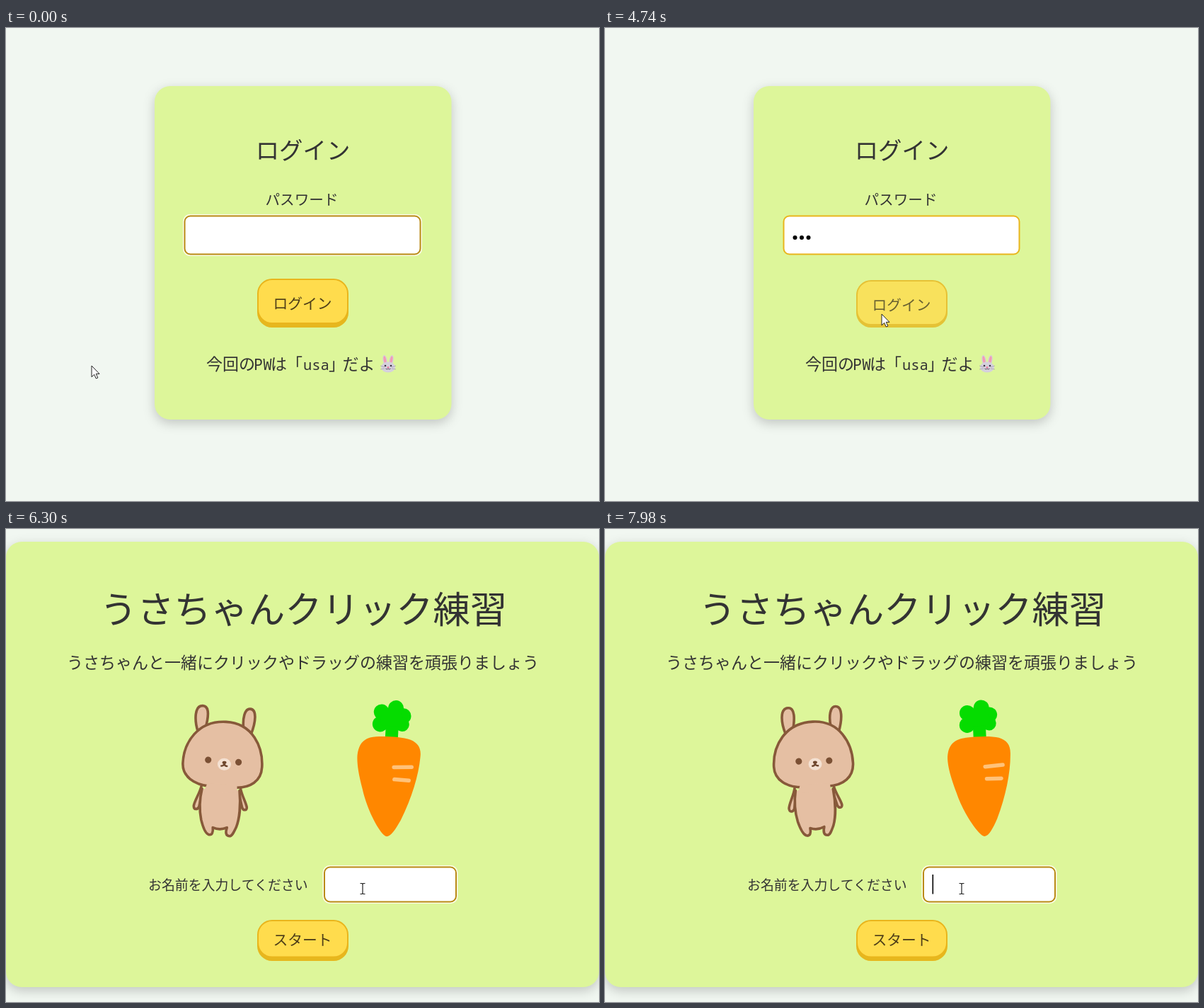
These frames come from a looping animation (838x668 px, 8000 ms). An HTML page:

```html
<!DOCTYPE html>
<html lang="ja">
<head>
<meta charset="utf-8">
<title>クリック練習</title>
<style>
html, body { margin: 0; width: 100%; height: 100%; overflow: hidden; background: #f1f7f1; }
svg { display: block; width: 100%; height: 100%; }
text { font-family: "Noto Sans CJK JP", "Noto Sans CJK", sans-serif; fill: #333; }
.mid { text-anchor: middle; }
.mono { font-family: "Noto Sans Mono", monospace; }
.card { fill: #ddf69a; filter: drop-shadow(0 5px 8px rgba(0, 0, 0, .2)); }
.field { fill: #fff; stroke-width: 2; }
.halo { fill: #fbfde8; }
.btn text { fill: #4d3d18; }
.face { fill: #ffdc4d; stroke: #e9b51c; stroke-width: 2; }
.edge { fill: #e6b71e; }
.fur { fill: #e5bfa3; stroke: #87593a; stroke-width: 3.6; stroke-linecap: round; stroke-linejoin: round; }
.line { fill: none; }
</style>
</head>
<body>
<svg viewBox="0 0 838 668">
  <rect width="838" height="668" fill="#f1f7f1"/>

  <g id="login">
    <rect class="card" x="210" y="82" width="419.5" height="471" rx="22"/>
    <text class="mid" x="419.5" y="185" font-size="33.4">ログイン</text>
    <text class="mid" x="418" y="249.5" font-size="20.6">パスワード</text>
    <rect id="halo1" class="halo" x="250" y="263" width="338" height="59" rx="10"/>
    <rect id="field1" class="field" x="252.5" y="265.5" width="333" height="54" rx="8"/>
    <g id="dots"><circle cx="268.5" cy="296" r="3"/><circle cx="278" cy="296" r="3"/><circle cx="287.5" cy="296" r="3"/></g>
    <rect id="caret1" y="279" width="2" height="27.5"/>
    <g id="btn1" class="btn">
      <rect id="edge1" class="edge" x="355" y="359" width="129" height="64" rx="21"/>
      <rect class="face" x="356" y="355" width="127" height="62" rx="20"/>
      <text class="mid" x="419" y="396.5" font-size="20.8">ログイン</text>
    </g>
    <text y="482.5" font-size="23"><tspan x="283">今回の</tspan><tspan class="mono" x="350" font-size="21.5">PW</tspan><tspan x="374">は</tspan><tspan x="396">「</tspan><tspan class="mono" x="420" font-size="20.5">usa</tspan><tspan x="456">」</tspan><tspan x="475.5">だよ</tspan></text>
    <g>
      <ellipse cx="535.5" cy="469" rx="3" ry="7" fill="#d5cdd8" transform="rotate(-10 535.5 469)"/>
      <ellipse cx="544.5" cy="469" rx="3" ry="7" fill="#d5cdd8" transform="rotate(10 544.5 469)"/>
      <ellipse cx="535.5" cy="469" rx="1.7" ry="5.5" fill="#f39ab5" transform="rotate(-10 535.5 469)"/>
      <ellipse cx="544.5" cy="469" rx="1.7" ry="5.5" fill="#f39ab5" transform="rotate(10 544.5 469)"/>
      <ellipse cx="540" cy="479" rx="10" ry="7.5" fill="#d5d0dc"/>
      <path d="M529 477l6 2M529 482l6-1M551 477l-6 2M551 482l-6-1" stroke="#a9a3b3" stroke-width=".8"/>
      <circle cx="536" cy="477" r="1.3" fill="#3c3043"/><circle cx="544" cy="477" r="1.3" fill="#3c3043"/>
      <ellipse cx="540" cy="479.3" rx="1.6" ry="1.1" fill="#ee6d97"/>
      <path d="M536.5 481q2 2 3.5 0q1.500 2 3.500 0" fill="none" stroke="#5c4b62"/>
    </g>
  </g>

  <g id="start">
    <rect class="card" x="0" y="18" width="838" height="629" rx="22"/>
    <text class="mid" x="420.5" y="132.500" font-size="52.3">うさちゃんクリック練習</text>
    <text class="mid" x="419.5" y="196.5" font-size="23">うさちゃんと一緒にクリックやドラッグの練習を頑張りましょう</text>

    <g id="rabbit">
      <path class="fur" d="M263 288C257 272 256 251 268 251C278 251 277 267 273 284"/>
      <path class="fur" d="M327 280C325 266 327 252 335 252C345 252 344 270 338 288"/>
      <path class="fur" d="M272 364C270 375 263 386 262.500 393C263 399 268 398 270 394L274 371"/>
      <path class="fur" d="M327 364C330 376 336 384 337.500 391C338 396 333 396 331 392L325 371"/>
      <path class="fur" d="M273 368C270 384 271 400 274 412C277 422 280 430 285 432C291 434 292 428 291 422Q301 426 311 421C309 428 310 433 315 433C319 433 321 427 324 420C328 408 329 388 326 368"/>
      <path class="fur" d="M284 364C261 363 244 352 244 333C244 304 262 272 302 272C340 272 356 305 356 333C356 353 341 364 319 364"/>
      <path d="M280 360H322L323 372H276Z" fill="#e5bfa3"/>
      <circle cx="279.500" cy="327" r="4.600" fill="#7b5034"/><circle cx="322.500" cy="328" r="4.600" fill="#7b5034"/>
      <ellipse cx="302.500" cy="332" rx="9.500" ry="8.500" fill="#f4e1d2"/>
      <ellipse cx="302.500" cy="329.500" rx="3" ry="2" fill="#6f472e"/>
      <path d="M298.500 334.500Q302.500 334.500 302.500 330Q302.500 334.500 306.500 334.500" fill="none" stroke="#6f472e" stroke-width="2.400" stroke-linecap="round"/>
    </g>

    <g id="carrot">
      <g fill="#05dc00">
        <circle cx="521" cy="259" r="11"/><circle cx="541" cy="252.500" r="11"/><circle cx="552" cy="263" r="11"/>
        <circle cx="520" cy="276" r="11"/><circle cx="551" cy="275" r="10"/><circle cx="536" cy="269" r="16"/>
        <rect x="528" y="278" width="18" height="18"/>
      </g>
      <path fill="#ff8700" d="M537 434C530 434 509 402 500 370C492 345 490 332 490 322C491 305 498 296 515 294C530 292.500 552 292.500 564 296C575 300 580 307 579 320C578 345 570 378 556 410C549 424 543 434 537 434Z"/>
      <path d="M542.500 336L567.500 334.500M544 353L564.500 353.500" stroke="#ffc27a" stroke-width="5.500" stroke-linecap="round"/>
    </g>

    <text x="201" y="510" font-size="18.9">お名前を入力してください</text>
    <rect id="halo2" class="halo" x="447.500" y="475" width="191" height="54" rx="10"/>
    <rect id="field2" class="field" x="450" y="477.500" width="186" height="49" rx="8"/>
    <rect id="caret2" x="462.500" y="488" width="1.600" height="27.500"/>
    <g class="btn">
      <rect class="edge" x="355" y="557" width="129" height="53" rx="21"/>
      <rect class="face" x="356" y="553" width="127" height="51.500" rx="20"/>
      <text class="mid" x="419" y="588" font-size="20.8">スタート</text>
    </g>
  </g>

  <path id="arrow" d="M0 0V15.800L3.700 12.300 6.300 18 8.800 17 6.300 11.400H11Z" fill="#fff" stroke="#222"/>
  <path id="beam" class="line" d="M-3.500-7.500H-1L0-6.500 1-7.500H3.500M0-6.500V6.500M-3.500 7.500H-1L0 6.500 1 7.500H3.500" stroke="#222" stroke-width="1.200"/>
</svg>
<script>
const LOOP = 8000, STEP = 60, BLINK = 540;
const SWITCH = 4800, PRESS = 4500, FOCUS = 5760;
const SWAY_FROM = 4778, SWAY_HALF = 1500, SWAY_DEG = 3;
const KEYS = [1260, 1680, 1800];
const MOUSE = [
  [2580, 121, 477], [2700, 328, 441], [3720, 328, 441], [4080, 391, 404],
  [5040, 391, 404], [5580, 479, 514], [5700, 504, 508]
];
const $ = id => document.getElementById(id);
const show = (id, on) => $(id).setAttribute('visibility', on ? 'inherit' : 'hidden');
const move = (id, x, y) => $(id).setAttribute('transform', `translate(${x} ${y})`);
const lit = (t, since) => Math.floor((t - since) / BLINK) % 2 === 0;

// CSS ease-in-out: cubic-bezier(.42, 0, .58, 1)
function ease(x) {
  let lo = 0, hi = 1;
  for (let i = 0; i < 20; i++) {
    const s = (lo + hi) / 2, r = 1 - s;
    if (1.26 * s * r * r + 1.74 * s * s * r + s * s * s < x) lo = s; else hi = s;
  }
  return lo * lo * (3 - 2 * lo);
}

function mouseAt(t) {
  const i = MOUSE.findIndex(p => p[0] > t);
  if (i === 0) return MOUSE[0].slice(1);
  if (i < 0) return MOUSE[MOUSE.length - 1].slice(1);
  const [t0, x0, y0] = MOUSE[i - 1], [t1, x1, y1] = MOUSE[i];
  const k = (t - t0) / (t1 - t0);
  return [x0 + (x1 - x0) * k, y0 + (y1 - y0) * k];
}

function setFocus(n, on) {
  show('halo' + n, on);
  $('field' + n).setAttribute('stroke', on ? '#b98a14' : '#e9b51c');
}

function drawLogin(t, x, y) {
  const typed = KEYS.filter(k => k <= t);
  [...$('dots').children].forEach((d, i) => d.setAttribute('visibility', i < typed.length ? 'inherit' : 'hidden'));
  setFocus(1, t < PRESS);
  $('caret1').setAttribute('x', 263.5 + 9.5 * typed.length);
  show('caret1', t < PRESS && lit(t, typed.length ? typed[typed.length - 1] : 240));
  const hover = x > 355 && x < 484 && y > 354 && y < 423;
  $('btn1').setAttribute('opacity', hover ? 0.8 : 1);
  move('btn1', 0, hover ? 2 : 0);
  move('edge1', 0, hover ? -2 : 0);
}

function drawStart(t) {
  const p = (t - SWAY_FROM) / SWAY_HALF, n = Math.floor(p);
  const k = ease(p - n);
  const deg = SWAY_DEG * (n % 2 ? 1 - 2 * k : 2 * k - 1);
  $('rabbit').setAttribute('transform', `rotate(${deg} 300 445)`);
  $('carrot').setAttribute('transform', `rotate(${deg} 535 445)`);
  setFocus(2, t >= FOCUS);
  show('caret2', t >= FOCUS && lit(t, FOCUS));
}

function draw(time) {
  const t = Math.floor(time % LOOP / STEP) * STEP;
  const second = t >= SWITCH;
  const [x, y] = mouseAt(t);
  show('login', !second);
  show('start', second);
  if (second) drawStart(t); else drawLogin(t, x, y);
  const inField = second && x > 449 && x < 637 && y > 477 && y < 527;
  show('arrow', !inField);
  show('beam', inField);
  move('arrow', x, y);
  move('beam', x, y);
}

const begin = performance.now();
function tick() {
  draw(performance.now() - begin);
  requestAnimationFrame(tick);
}
tick();
</script>
</body>
</html>
```
